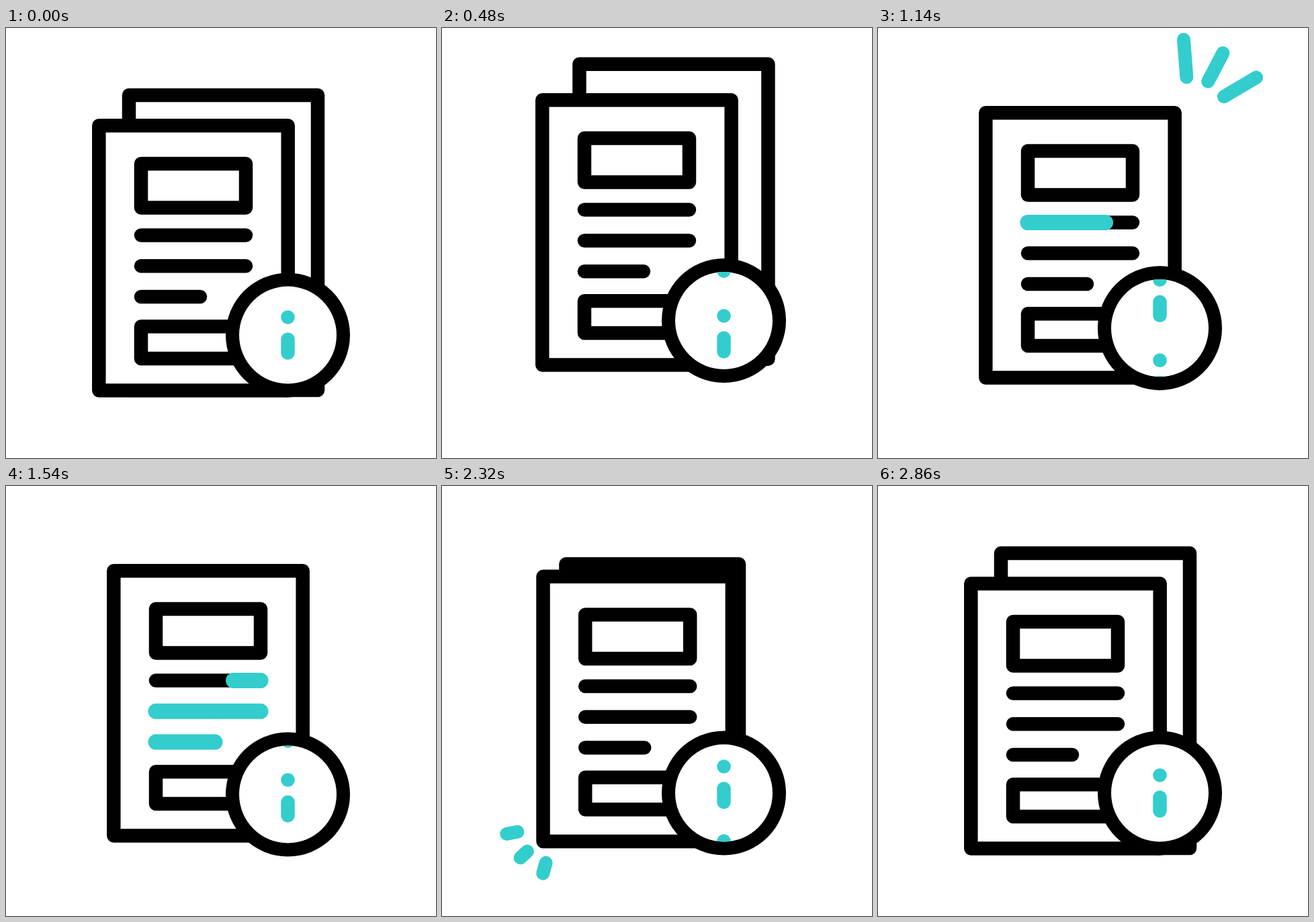
An HTML page with a canvas that plays this animation: 640x640 px, repeating every 3020 ms.

```html
<!DOCTYPE html>
<html>
<head>
<meta charset="utf-8">
<style>
  html, body { margin: 0; width: 100%; height: 100%; overflow: hidden; background: #fff; }
  canvas { display: block; }
</style>
</head>
<body>
<canvas id="stage" width="640" height="640"></canvas>
<script>
const ctx = document.getElementById('stage').getContext('2d');
const TEAL = '#33cdcd';
const STROKE = 20.5;
const LOOP = 3020;
const RAD = Math.PI / 180;

function ease(t, from, to) {
  const u = Math.min(1, Math.max(0, (t - from) / (to - from)));
  return u * u * (3 - 2 * u);
}

// Smooth curve through [time, value] keys that never overshoots them.
function curve(t, keys) {
  if (t <= keys[0][0]) return keys[0][1];
  const i = keys.findIndex(key => key[0] > t);
  if (i < 0) return keys[keys.length - 1][1];
  const rate = k => k > 0 && k < keys.length
    ? (keys[k][1] - keys[k - 1][1]) / (keys[k][0] - keys[k - 1][0]) : 0;
  const slope = k => {
    const a = rate(k), b = rate(k + 1);
    return a * b > 0 ? 2 * a * b / (a + b) : 0;
  };
  const [t0, v0] = keys[i - 1], [t1, v1] = keys[i];
  const d = t1 - t0, u = (t - t0) / d;
  return v0 + (v1 - v0) * ease(t, t0, t1)
    + d * u * (1 - u) * (slope(i - 1) * (1 - u) - slope(i) * u);
}

// Pages lift, stack behind each other, then return to rest.
const pose = (t, rest, lifted, stacked) => rest
  + (lifted - rest) * ease(t, 160, 490)
  + (stacked - lifted) * ease(t, 490, 955)
  + (rest - stacked) * ease(t, 1975, 2720);

function line(x1, y1, x2, y2, color = '#000', width = STROKE) {
  ctx.strokeStyle = color;
  ctx.lineWidth = width;
  ctx.beginPath();
  ctx.moveTo(x1, y1);
  ctx.lineTo(x2, y2);
  ctx.stroke();
}

function box(x, y, w, h) {
  ctx.strokeStyle = '#000';
  ctx.fillStyle = '#fff';
  ctx.lineWidth = STROKE;
  ctx.beginPath();
  ctx.rect(x, y, w, h);
  ctx.fill();
  ctx.stroke();
}

function disc(x, y, r, color) {
  ctx.fillStyle = color;
  ctx.beginPath();
  ctx.arc(x, y, r, 0, Math.PI * 2);
  ctx.fill();
}

// A horizontal teal stroke that grows to the right, then shrinks to the right.
function sweep(t, x1, x2, y, grow, trim, duration, width) {
  const head = ease(t, grow, grow + duration);
  const tail = ease(t, trim, trim + duration);
  if (head <= 0 || tail >= 1) return;
  line(x1 + (x2 - x1) * tail, y, x1 + (x2 - x1) * head, y, TEAL, width);
}

function backPage(t) {
  const size = pose(t, 1, 1, 0.85);
  const w = 281 * size, h = 439 * size;
  box(pose(t, 323.5, 345, 305) - w / 2, pose(t, 319.5, 273, 316) - h / 2, w, h);
}

function frontPage(t) {
  ctx.save();
  ctx.translate(pose(t, 0, 11, 22), pose(t, 0, -38, -19));
  box(138.3, 145.2, 281.4, 394.3);
  box(201, 202, 156, 65.5);
  box(201, 444.2, 156, 47.8);
  for (let i = 0; i < 3; i++) {
    const y = 308.5 + 45.8 * i, right = i < 2 ? 357 : 289, delay = 160 * i;
    line(201, y, right, y);
    sweep(t, 201, right, y, 980 + delay, 1380 + delay, 240, 23);
  }
  ctx.restore();
}

function badge(t) {
  const x = 419.5;
  const y = curve(t, [[160, 457], [480, 435.5], [740, 459], [1000, 432],
    [1320, 468], [1790, 448], [2320, 457]]);
  const scroll = curve(t, [[160, 0], [480, 19.5], [840, 131], [1140, 194.5],
    [1540, 245], [2320, 338], [2860, 351]]);
  disc(x, y, 92.5, '#000');
  disc(x, y, 72.5, '#fff');
  ctx.save();
  ctx.clip();
  for (const offset of [0, 120, 240, 351]) {
    const dot = y - 26.5 + scroll - offset;
    disc(x, dot, 10.3, TEAL);
    line(x, dot + 33, x, dot + 53, TEAL);
  }
  ctx.restore();
}

// Three rays fanned around a point; the middle one is shorter.
function rays(t, x, y, angle, grow) {
  for (let i = 0; i < 3; i++) {
    ctx.save();
    ctx.translate(x, y);
    ctx.rotate((angle + 32 * i) * RAD);
    sweep(t, 59, i === 1 ? 111 : 120, 0, grow, grow + 220, 200, 20);
    ctx.restore();
  }
}

function draw(t) {
  ctx.fillStyle = '#fff';
  ctx.fillRect(0, 0, 640, 640);
  ctx.lineCap = ctx.lineJoin = 'round';
  backPage(t);
  frontPage(t);
  badge(t);
  rays(t, 464, 132, -94.5, 975);
  rays(t, 170.4, 504, 105.5, 2252);
}

const start = performance.now();
function tick() {
  const t = (performance.now() - start) % LOOP;
  draw(Math.floor(t / 20) * 20);
  requestAnimationFrame(tick);
}
tick();
</script>
</body>
</html>
```
